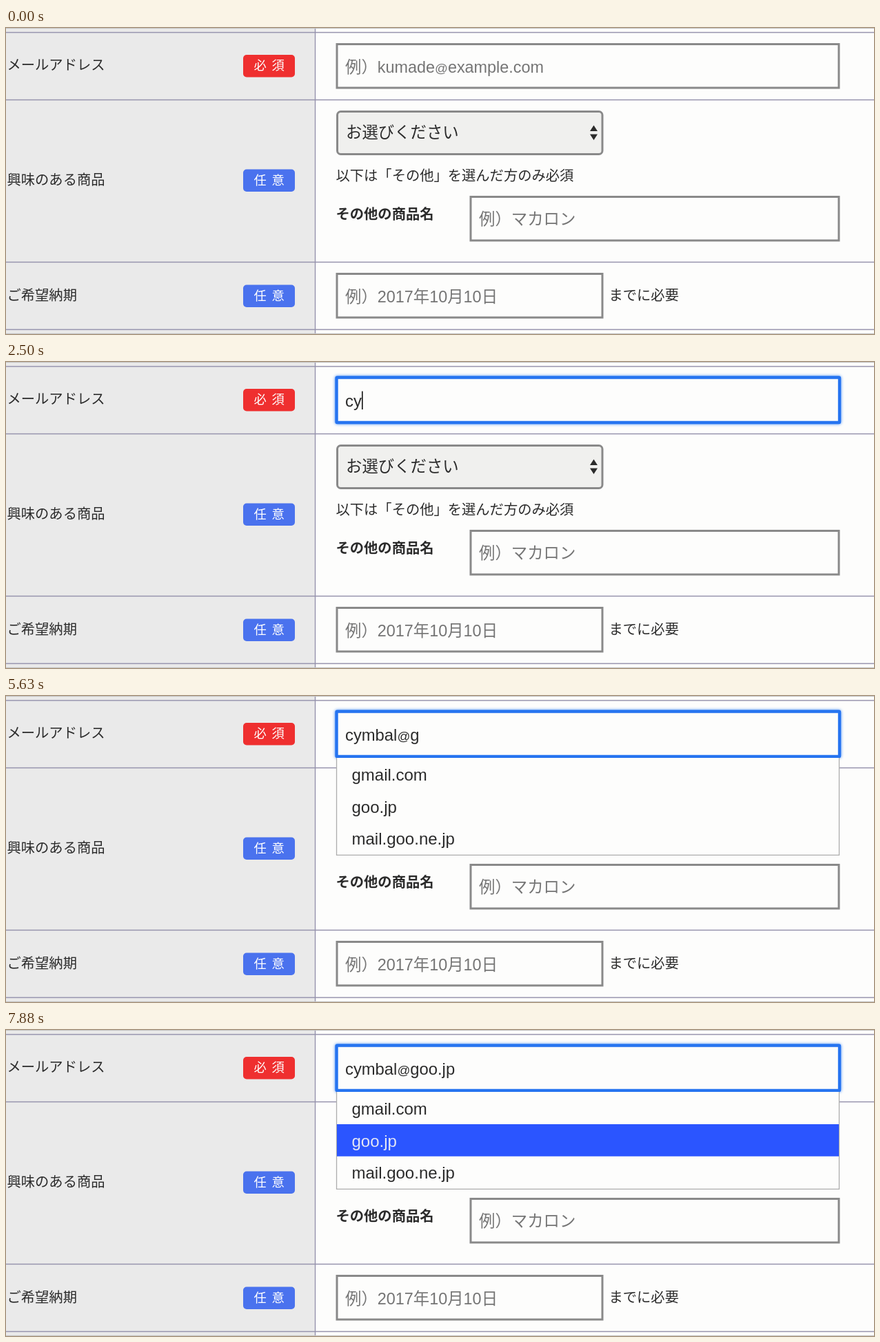
Animation, 1259 px wide and 445 px high, one loop 8 s. Source, as an HTML page:

```html
<!DOCTYPE html>
<html lang="ja">
<head>
<meta charset="utf-8">
<style>
  html, body { margin: 0; width: 100%; height: 100%; overflow: hidden; background: #fdfdfc; }
  svg { display: block; width: 1259px; height: 445px; }
  text { font: 20.3px "Liberation Sans", "Noto Sans CJK JP", "Noto Sans CJK", sans-serif; fill: #2b2b2b; white-space: pre; }
  .field { fill: #fdfdfc; stroke: #898989; stroke-width: 3; }
  .hint { font-size: 23.4px; fill: #757575; }
  .value { font-size: 23.8px; }
  .item { font-size: 24px; }
  .at { font-size: 18.6px; }
  .badge { font-size: 18.3px; letter-spacing: 7.7px; fill: #fff; }
  .line { stroke: #9693ad; stroke-width: 1.4; }
  .ring { fill: #fdfdfc; stroke: #2674f0; stroke-width: 4.4; filter: drop-shadow(0 0 2px #4b90f6); }
</style>
</head>
<body>
<svg viewBox="0 0 1259 445">
  <g id="form"></g>
  <g id="email"></g>
  <g id="menu"></g>
  <g id="pointer"></g>
</svg>
<script>
const LOOP = 8000;
const ROW = 46.7, MENU_TOP = 90;
const USER = "cymbal@";
const DOMAINS = ["yahoo.co.jp", "gmail.com", "ezweb.ne.jp", "docomo.ne.jp",
  "softbank.ne.jp", "i.softbank.jp", "icloud.com", "hotmail.com"];
const MATCHES = ["gmail.com", "goo.jp", "mail.goo.ne.jp"];

const FOCUS = 1130, OPEN = 4250, FILTER = 5130;
// Text in the field from each moment on
const TYPING = [[2380, 1], [2500, 2], [2750, 3], [2880, 4], [3130, 5], [3380, 6], [4130, 7]]
  .map(([time, count]) => [time, USER.slice(0, count)])
  .concat([[4880, USER + "g"], [7000, USER + MATCHES[0]], [7250, USER + MATCHES[1]]]);
// The caret is toggled at these moments, starting hidden
const CARET = [1130, 1630, 2130, 3880, 4130, 4630, 4880, 5380, 5880, 6380, 6880, 7630];

const $ = id => document.getElementById(id);
const rect = (x, y, w, h, attrs) =>
  `<rect x="${x}" y="${y}" width="${w}" height="${h}" ${attrs}/>`;
const field = (x, y, w, h, attrs = "") =>
  rect(x + 1.5, y + 1.5, w - 3, h - 3, `class="field" ${attrs}`);
const label = (x, y, string, attrs = "") =>
  `<text x="${x}" y="${y}" ${attrs}>${string.replace("@", '<tspan class="at">@</tspan>')}</text>`;
const line = (x1, y1, x2, y2, attrs = 'class="line"') =>
  `<line x1="${x1}" y1="${y1}" x2="${x2}" y2="${y2}" ${attrs}/>`;
const badge = (y, string, color) =>
  rect(344, y, 75, 32.5, `rx="5" fill="${color}"`) + label(359.5, y + 22, string, 'class="badge"');

const BLUE = "#4a72ee", HINT = 'class="hint"';
const EDGE = 'stroke="#c4c4c4"';
const PLACEHOLDER = label(492, 64.5, "例）kumade@example.com", HINT);

$("form").innerHTML =
  rect(0, 0, 1259, 445, 'fill="#fdfdfc"') +
  rect(0, 0, 448, 445, 'fill="#eaeaea"') +
  [6.5, 104.5, 340.5, 438.5].map(y => line(0, y, 1259, y)).join("") +
  line(448.5, 0, 448.5, 445) +
  line(0, 0.5, 1259, 0.5, EDGE) + line(0, 444.5, 1259, 444.5, EDGE) +
  label(1.5, 61, "メールアドレス") + badge(39, "必須", "#ef2f2f") +
  label(1.5, 227.5, "興味のある商品") + badge(205.5, "任意", BLUE) +
  label(1.5, 395.5, "ご希望納期") + badge(373.5, "任意", BLUE) +
  field(479, 120, 387.5, 65, 'rx="5" style="fill:#f0f0ee"') +
  label(493, 160, "お選びください", 'style="font-size:23.4px"') +
  '<path d="M847 150l5.5-8.5 5.5 8.5zM847 154.5h11l-5.5 8.5z" fill="#2b2b2b"/>' +
  label(478.5, 221.5, "以下は「その他」を選んだ方のみ必須") +
  label(478.5, 277.5, "その他の商品名", 'font-weight="bold" style="font-weight:bold"') +
  field(672.5, 244, 537, 66.5) + label(686, 285.5, "例）マカロン", HINT) +
  field(478.5, 356, 388, 66.5) + label(492, 398.5, "例）2017年10月10日", HINT) +
  label(874.5, 395.5, "までに必要");

function drawEmail(t) {
  const value = TYPING.reduce((now, [time, string]) => t >= time ? string : now, "");
  const caretOn = CARET.filter(time => t >= time).length % 2 === 1;
  $("email").innerHTML =
    (t < FOCUS ? field(478.5, 22, 731, 66.5) : rect(479.5, 22.5, 729.5, 65.5, 'rx="1" class="ring"')) +
    (value ? label(492, 64.5, value, 'class="value"') : PLACEHOLDER);
  if (caretOn) {
    const width = value ? $("email").querySelector("text").getComputedTextLength() : 0;
    const x = 493 + width;
    $("email").innerHTML += line(x, 42.5, x, 69, 'stroke="#111" stroke-width="1.6"');
  }
}

function drawMenu(t) {
  if (t < OPEN) return void ($("menu").innerHTML = "");
  const items = t < FILTER ? DOMAINS : MATCHES;
  const selected = t >= 7250 ? 1 : t >= 7000 ? 0 : -1;
  $("menu").innerHTML =
    rect(479.5, MENU_TOP, 729, items.length * ROW + 1.2, 'fill="#fdfdfc"') +
    `<path d="M479.5 ${MENU_TOP}v${items.length * ROW + 1.2}h729V${MENU_TOP}" fill="none" stroke="#adadad" stroke-width="1.3"/>` +
    items.map((name, i) => {
      const y = MENU_TOP + 0.3 + i * ROW, active = i === selected;
      return (active ? rect(480, y, 728, ROW, 'fill="#2b55ff"') : "") +
        label(501.5, y + 32.5, name, `class="item" ${active ? 'style="fill:#e4e6f4"' : ""}`);
    }).join("");
}

function drawPointer(t) {
  const visible = t >= 250 && t < TYPING[0][0];
  if (!visible) return void ($("pointer").innerHTML = "");
  const rest = (1 - Math.min((t - 130) / 870, 1)) ** 2;
  const x = 1074.5 + 190 * rest, y = 65.5 + 210 * rest;
  const overField = x < 1209 && (y < 88 || y > 244);
  const beam = "M-5-11q5 0 5 3q0-3 5-3M0-8V8M-5 11q5 0 5-3q0 3 5 3M-3 0h6";
  const arrow = "M0 0v20l4.6-4.3 3.4 7.6 3.4-1.5-3.3-7.4h6.2z";
  $("pointer").innerHTML = `<g transform="translate(${x} ${y})">` + (overField
    ? `<path d="${beam}" fill="none" stroke="#fff" stroke-width="3.6"/><path d="${beam}" fill="none" stroke="#111" stroke-width="1.7"/>`
    : `<path d="${arrow}" fill="#111" stroke="#fff" stroke-width="1.5"/>`) + "</g>";
}

function draw(now) {
  const t = now % LOOP;
  drawEmail(t);
  drawMenu(t);
  drawPointer(t);
  requestAnimationFrame(draw);
}
draw(0);
</script>
</body>
</html>
```
